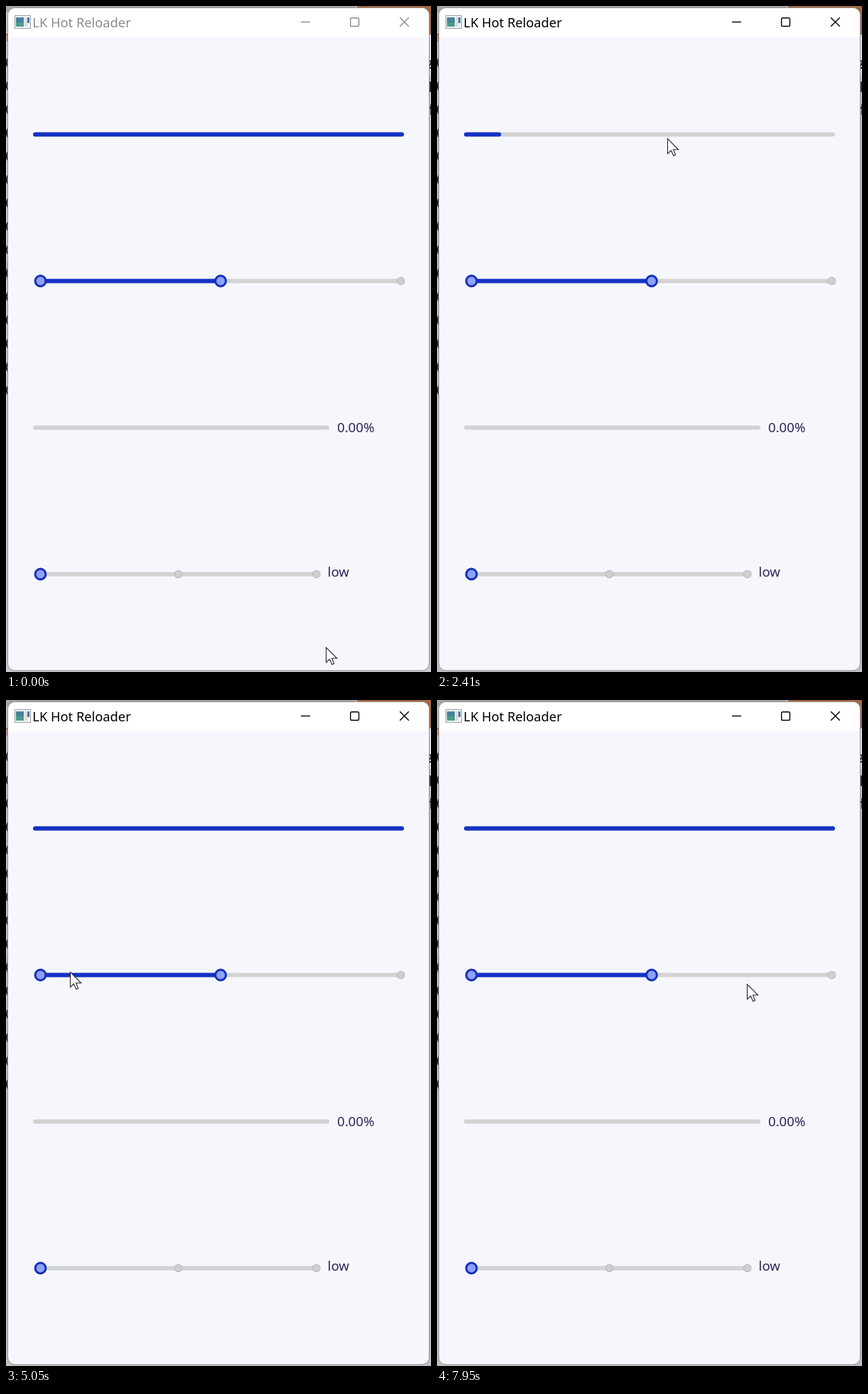
An HTML page that plays this animation: 598x936 px, repeating every 8000 ms.

```html
<!DOCTYPE html>
<html lang="en">
<head>
<meta charset="utf-8">
<title>LK Hot Reloader</title>
<style>
  html, body { margin: 0; width: 100%; height: 100%; overflow: hidden; background: #c6c6c8; }
  svg { display: block; width: 100vw; height: 100vh; }
  text { font-family: "Noto Sans", "Open Sans", sans-serif; font-size: 18.6px; fill: #2c2458; }
  .track { fill: #d2d2d3; }
  .fill { fill: #1432c3; }
  .dot { fill: #d0d0d1; stroke: #b9b9ba; stroke-width: 1.2; }
  .on { fill: #8da1fa; stroke: #152fb6; stroke-width: 3; }
</style>
</head>
<body>
<svg viewBox="0 0 598 936" preserveAspectRatio="none">
  <rect id="desk" width="598" height="936"/>
  <rect width="492" height="9" fill="#a6a6aa"/>
  <rect x="494" width="104" height="40" fill="#a5673f"/>
  <rect x="590" y="40" width="8" height="57" fill="#dededf"/>
  <rect x="590" y="97" width="8" height="33" fill="#c4c4c6"/>
  <rect x="0" y="360" width="4" height="26" fill="#b4b4b6"/>
  <g id="code" fill="none" stroke="#1d1d1f" stroke-width="1.8"></g>
  <rect x="2.5" y="2.5" width="593" height="931.5" rx="10" fill="#f6f7fd" stroke="#8f8f92"/>
  <path d="M3 44V13a10 10 0 0 1 10-10H585a10 10 0 0 1 10 10V44Z" fill="#fff"/>
  <g>
    <rect x="12.5" y="13.5" width="22" height="18" fill="#f4f5f6" stroke="#9b9fa3"/>
    <rect x="14" y="16" width="11" height="13" fill="#45849c"/>
    <rect x="14" y="23" width="11" height="6" fill="#4f9a8d"/>
    <rect x="26" y="16" width="4" height="13" fill="#d8dde1"/>
    <rect x="30" y="16" width="3" height="8" fill="#5377a5"/>
  </g>
  <text id="title" x="37.3" y="29.5" style="font-size:18.3px">LK Hot Reloader</text>
  <g id="caption" fill="none" stroke-width="1.4">
    <path d="M415 22.5H428"/>
    <rect x="484.7" y="16.7" width="11.8" height="11.8" rx="1.8"/>
    <path d="M554.2 16.2L566.8 28.8M566.8 16.2L554.2 28.8"/>
  </g>
  <g id="ui"></g>
  <text x="466" y="599">0.00%</text>
  <text x="452.6" y="802">low</text>
  <path id="cursor" fill="#fff" stroke="#26262b" stroke-width="1.1"
    d="M.5 .5V21.5L5.4 17L8.8 24.5L11.6 23.2L8.5 15.8H15.7Z"/>
  <circle id="click" r="18" fill="#ff0" fill-opacity=".47"/>
</svg>
<script>
const LOOP = 8000;
const $ = id => document.getElementById(id);

function add(parent, tag, attrs) {
  const el = document.createElementNS("http://www.w3.org/2000/svg", tag);
  for (const k in attrs) el.setAttribute(k, attrs[k]);
  return parent.appendChild(el);
}
const bar = (cls, x, y, width) =>
  add($("ui"), "rect", { class: cls, x, y: y - 3, width, height: 6, rx: 3 });
const dot = (cx, cy) => add($("ui"), "circle", { cx, cy });
function setDot(el, on) {
  el.setAttribute("class", on ? "on" : "dot");
  el.setAttribute("r", on ? 7.4 : 5.2);
}

// Slivers of the editor behind the window
for (let i = 0; i < 15; i++)
  add($("code"), "path", { d: `M4 ${71.5 + i * 32.9}q-6.5 8 0 16` });
add($("code"), "path", { d: "M0 40h2v10", stroke: "#a85b3a" });
add($("code"), "path", { d: "M595 77q5 0 2 5l-3 5h5M597 106v15M595 143h4M598 138v15" });

bar("track", 38, 180.5, 522);
const progress = bar("fill", 38, 180.5, 522);
bar("track", 48, 386.5, 508);
const half = bar("fill", 48, 386.5, 254);
const [first, middle, last] = [48.5, 302, 555.5].map(x => dot(x, 386.5));
bar("track", 38, 592.5, 417);
bar("track", 48, 798.5, 389);
[48.5, 242.5, 436.8].forEach((x, i) => setDot(dot(x, 798.5), i === 0));
setDot(first, true);
setDot(last, false);

const clamp = v => Math.min(1, Math.max(0, v));
const smooth = p => p * p * (3 - 2 * p);
const easeIn = p => p ** 1.5;
const easeOut = p => 1 - (1 - p) ** 2;

// CSS "ease" curve, solved by bisection
function ease(p) {
  if (p <= 0 || p >= 1) return clamp(p);
  let lo = 0, hi = 1, s = 0.5;
  for (let i = 0; i < 20; i++) {
    s = (lo + hi) / 2;
    if (0.75 * s * (1 - s) + s ** 3 < p) lo = s; else hi = s;
  }
  return 0.3 * s * (1 - s) ** 2 + 3 * s * s * (1 - s) + s ** 3;
}

// Pointer moves: start, end, control point, target, easing
const moves = [
  [20, 260, [365, 640], [288, 424], smooth],
  [570, 1380, [260, 308], [320, 192], smooth],
  [1400, 1490, [322, 188], [324, 186], smooth],
  [4070, 4420, [238, 322], [190, 389], easeIn],
  [4420, 4900, [148, 412], [108, 383], easeOut],
  [4910, 5320, [92, 383], [77, 381], easeOut],
  [6290, 7000, [195, 402], [285, 390], smooth],
  [7810, 7950, [360, 394], [436, 399], easeIn],
];
function pointer(t) {
  let pos = [450, 901];
  for (const [start, end, ctrl, to, curve] of moves) {
    if (t < start) break;
    const k = curve(clamp((t - start) / (end - start)));
    pos = pos.map((v, i) => v * (1 - k) ** 2 + 2 * ctrl[i] * k * (1 - k) + to[i] * k * k);
  }
  return pos;
}

const presses = [[1790, 2010], [3030, 3220], [5610, 5870], [7240, 7490]];

function draw(t) {
  const active = t >= 1790;
  $("desk").setAttribute("fill", active ? "#bfbfc1" : "#cacacc");
  $("title").style.fill = active ? "#000" : "#8c8c8c";
  $("caption").setAttribute("stroke", active ? "#000" : "#8a8a8a");

  const level = t < 3220 ? 1 - ease((t - 2000) / 660) : ease((t - 3248) / 700);
  progress.setAttribute("width", 522 * level);

  const filled = t < 5870 || t >= 7490;
  half.setAttribute("visibility", filled ? "visible" : "hidden");
  setDot(middle, filled);

  const place = `translate(${pointer(t).map(v => Math.round(v)).join()})`;
  $("cursor").setAttribute("transform", place);
  $("click").setAttribute("transform", place);
  const down = presses.some(([a, b]) => t >= a && t < b);
  $("click").setAttribute("visibility", down ? "visible" : "hidden");
}

const begin = performance.now();
function tick() {
  draw((performance.now() - begin) % LOOP);
  requestAnimationFrame(tick);
}
tick();
</script>
</body>
</html>
```
